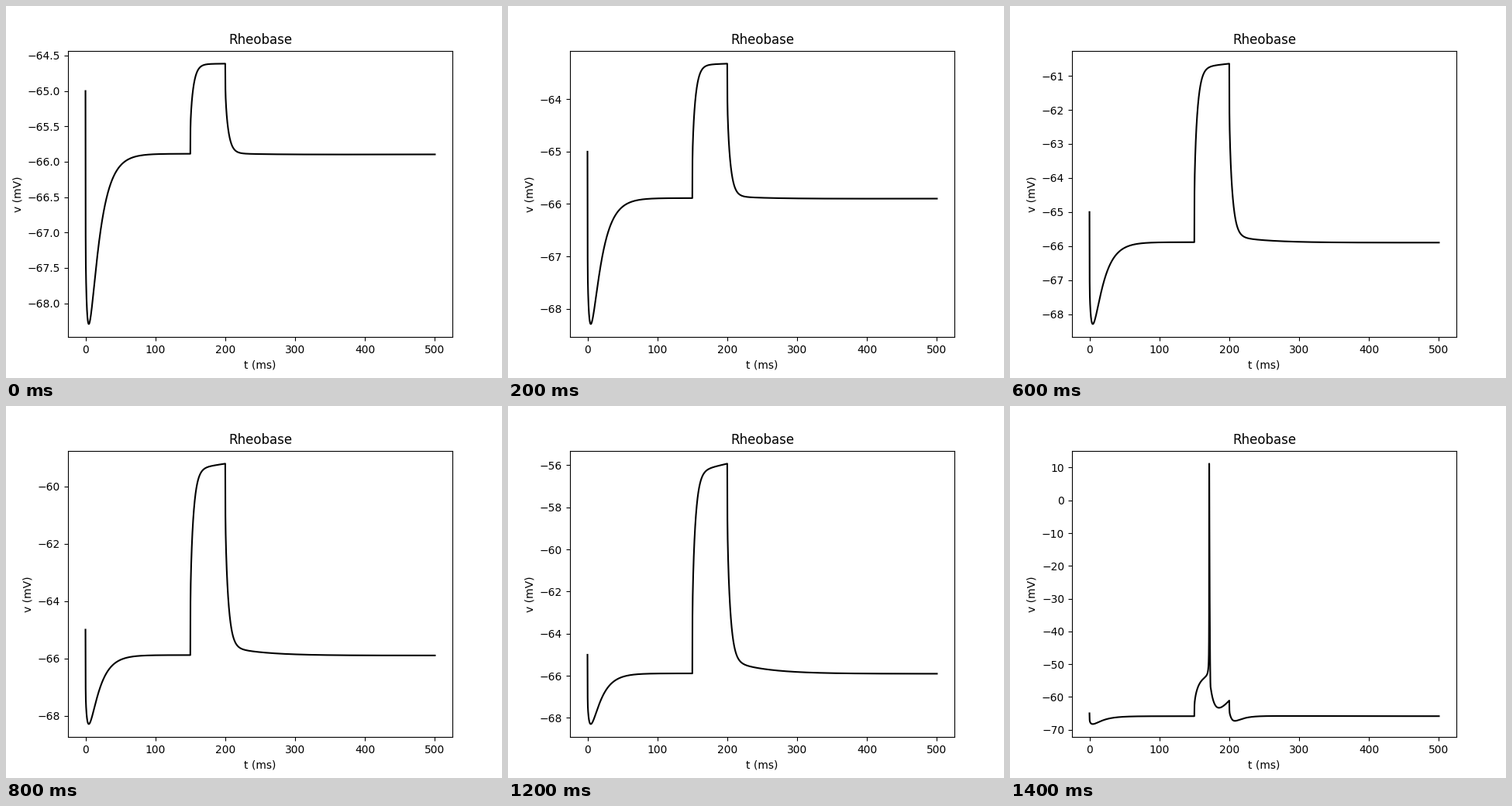
Recreate the animation shown at these times as a matplotlib script. Size 640x480 px, loop 1.8 s.

```python
import numpy as np
import matplotlib.pyplot as plt
from matplotlib.animation import FuncAnimation

STEP_MS = 200
FRAMES = 9
LEVELS = 7
REST = -65.887
ON, OFF = 150, 200
SPIKE, REPOLARISED = 171.3, 173.3
PEAK, FLOOR = 11.2, -57

t = np.arange(0, 500.01, 0.05)


def decay(s, tau):
    return np.exp(-np.maximum(s, 0) / tau)


def settle(s, tau=4.9):
    """Fast, medium and slow relaxation from 1 to 0."""
    return 0.26 * decay(s, 0.12) + 0.11 * decay(s, 0.9) + 0.63 * decay(s, tau)


def resting():
    return (REST - 4.68 * decay(t, 15) + 2.87 * decay(t, 4.5)
            + 0.6 * decay(t, 1) + 2.097 * decay(t, 0.12))


def subthreshold(level):
    """Response to a current step; its height grows faster near threshold."""
    height = 1.259 * level + 0.0308 * 1.685 ** level - 0.038
    slow = 0.0089 * level ** 2.2
    s, r = t - ON, t - OFF
    ramp = 0.6 * slow
    rise = (height - ramp) * (1 - settle(s)) + ramp * s / (OFF - ON)
    sag = (0.013 + 0.002 * level) * (1 - decay(r, 60)) * decay(r, 600)
    fall = (height - slow) * settle(r) + slow * decay(r, 50) - sag
    return resting() + np.where(t < ON, 0, np.where(t <= OFF, rise, fall))


def spiking():
    s, r = t - ON, t - OFF
    run_up = 4 / np.maximum(SPIKE - t, 0.02) - 4 / (SPIKE - ON)
    climb = np.minimum(REST + 12 * (1 - settle(s, 6)) + run_up, PEAK)

    u = (t - SPIKE) / (REPOLARISED - SPIKE)
    drop = FLOOR + (PEAK - FLOOR) * (1 - u) ** 2

    q = t - REPOLARISED
    recover = FLOOR + 0.24 * q - 10.65 * (1 - decay(q, 6))

    rebound = (REST - 4.5 * decay(r, 12) + 6 * decay(r, 4) + 3.1 * decay(r, 0.15)
               + 0.14 * (1 - decay(r, 12)) * decay(r, 100))
    return np.select([t < ON, t < SPIKE, t < REPOLARISED, t <= OFF],
                     [resting(), climb, drop, recover], rebound)


traces = [subthreshold(level) for level in range(1, LEVELS + 1)] + [spiking()]

fig, ax = plt.subplots(figsize=(6.4, 4.8), dpi=100)
line, = ax.plot(t, traces[0], color="black", lw=1.5)
ax.set(title="Rheobase", xlabel="t (ms)", ylabel="v (mV)")


def update(frame):
    # The spike is held for the remaining steps.
    line.set_ydata(traces[min(frame, LEVELS)])
    ax.relim()
    ax.autoscale_view()
    return line,


anim = FuncAnimation(fig, update, frames=FRAMES, interval=STEP_MS,
                     repeat=True, repeat_delay=0)
plt.show()
```
